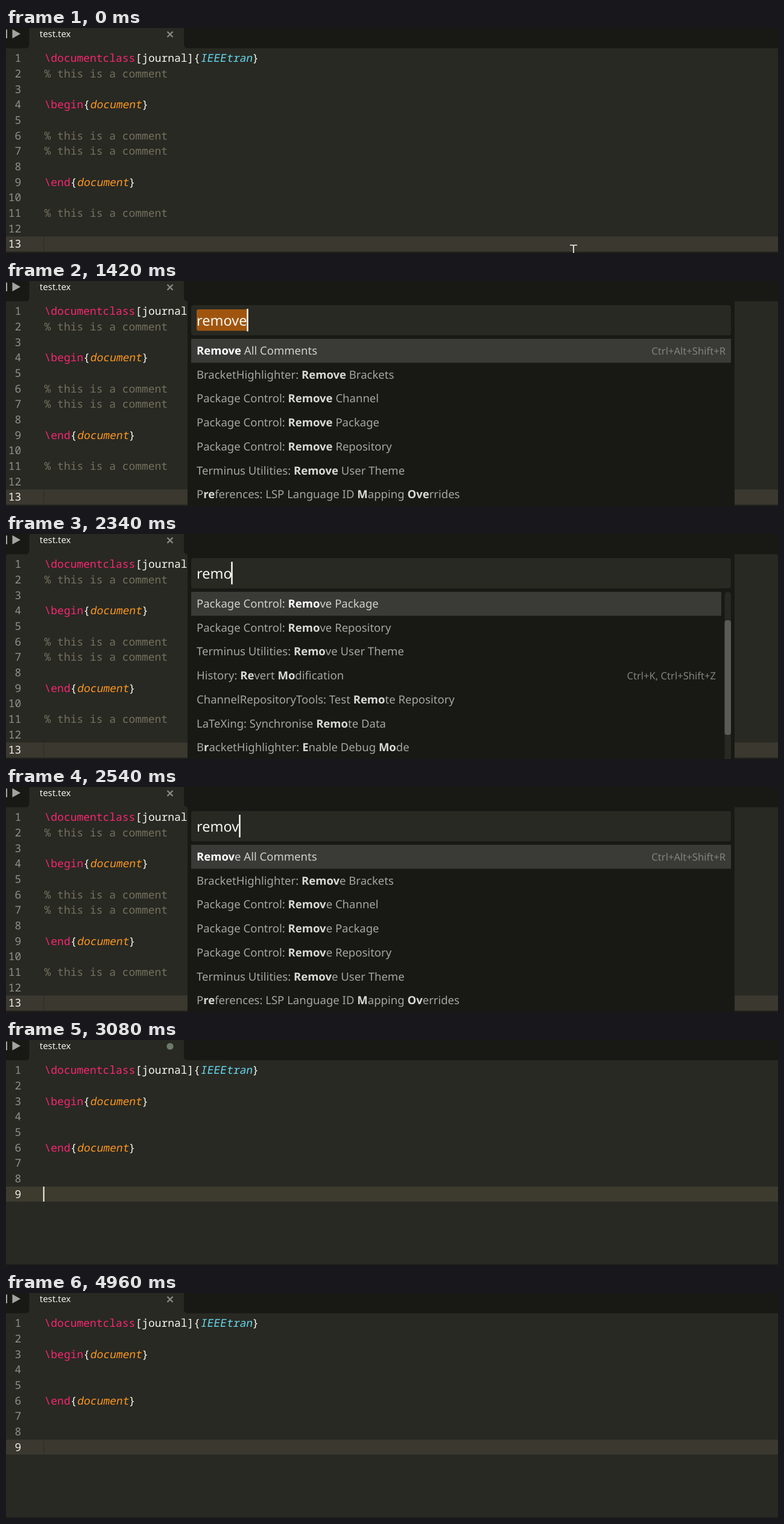
Write an HTML page that moves like this. It is 1280 by 373 pixels and loops after 5.09 s.

```html
<!DOCTYPE html>
<html lang="en">
<head>
<meta charset="utf-8">
<title>Remove all comments</title>
<style>
  html, body { margin: 0; width: 100%; height: 100%; overflow: hidden; background: #282923; }
  svg { display: block; width: 100%; height: 100%; }
  text { white-space: pre; text-rendering: geometricPrecision; }
  .code { font: 17.95px "Noto Sans Mono", "DejaVu Sans Mono", monospace; }
  .ui { font-family: "Noto Sans", "Open Sans", sans-serif; }
  .bold { font-weight: 700; }
</style>
</head>
<body>
<svg id="stage" viewBox="0 0 1280 373" preserveAspectRatio="none"></svg>
<script>
const LOOP = 5090;
const stage = document.getElementById('stage');
const COL = 10.77, LINE = 25.67, CODE_X = 63.6;
const INK = { p: '#f92672', w: '#f8f8f2', b: '#66d9ef', o: '#fd971f', c: '#75715e' };
const BACK = '#282923', DARK = '#181914';

// Each code line is a list of [ink, text] runs
const COMMENT = [['c', '% this is a comment']];
const HEAD = [['p', '\\documentclass'], ['w', '[journal]{'], ['b', 'IEEEtran'], ['w', '}']];
const env = word => [['p', '\\' + word], ['w', '{'], ['o', 'document'], ['w', '}']];
const BEFORE = [HEAD, COMMENT, [], env('begin'), [], COMMENT, COMMENT, [], env('end'), [], COMMENT, [], []];
const AFTER = [HEAD, [], env('begin'), [], [], env('end'), [], [], []];

// Asterisks enclose the matched letters, a bar precedes the shortcut
const LIST_RE = [
  'Permute Lines: *Re*verse', 'Project: *Re*fresh Folders', 'Set Syntax: *RE*G',
  'BracketHighlighter: *Re*move Brackets', 'Package Control: *Re*move Channel',
  'Package Control: *Re*move Package', 'Package Control: *Re*move Repository'];
const LIST_REMO = [
  'Package Control: *Remo*ve Package', 'Package Control: *Remo*ve Repository',
  'Terminus Utilities: *Remo*ve User Theme', 'History: *Re*vert *Mo*dification|Ctrl+K, Ctrl+Shift+Z',
  'ChannelRepositoryTools: Test *Remo*te Repository', 'LaTeXing: Synchronise *Remo*te Data',
  'B*r*acketHighlighter: *E*nable Debug *Mo*de'];
const LIST_REMOVE = [
  '*Remove* All Comments|Ctrl+Alt+Shift+R', 'BracketHighlighter: *Remove* Brackets',
  'Package Control: *Remove* Channel', 'Package Control: *Remove* Package',
  'Package Control: *Remove* Repository', 'Terminus Utilities: *Remove* User Theme',
  'P*re*ferences: LSP Language ID *M*apping *Ove*rrides'];
const unmatchLast = list => list.map(s => s.replace(/(.)\*([^*]*)$/, '*$1$2'));

const short = { rows: LIST_RE, pick: 5, shift: 0.8, thumb: [122, 36] };
const medium = { rows: LIST_REMO, pick: 0, shift: 0, thumb: [143, 190] };
const full = { rows: LIST_REMOVE, pick: 0, shift: 0 };
const PALETTE = [
  [1420, { ...full, typed: 'remove', selected: true }],
  [1820, { ...short, rows: unmatchLast(LIST_RE), typed: 'r' }],
  [2080, { ...short, typed: 're' }],
  [2210, { ...medium, rows: unmatchLast(LIST_REMO), typed: 'rem' }],
  [2340, { ...medium, typed: 'remo' }],
  [2540, { ...full, rows: unmatchLast(LIST_REMOVE), typed: 'remov' }],
  [2670, { ...full, typed: 'remove' }],
  [3080, null]];
const CARET_X = [316, 326, 338, 361, 374, 387, 400];

// Stepped values: [start, value]
const CARET = [[0, 0], [410, 1], [880, 0.5], [1030, 0], [3080, 1], [3500, 0.67], [3600, 0.33], [3700, 0],
  [4020, 0.25], [4090, 0.5], [4160, 0.75], [4220, 1], [4620, 0.5], [4690, 0]];
const MOUSE = [[0, [941, 370.5]], [70, [720, 368]], [140, [450, 365]], [200, [270, 362]], [270, [213.5, 361]],
  [880, null], [3960, [264.5, 354.5]], [4020, [325, 358]], [4090, [395, 361]], [4160, [449, 365]], [4220, null]];

function at(steps, t) {
  let value = null;
  for (const [start, v] of steps) if (t >= start) value = v;
  return value;
}

const rect = (x, y, w, h, fill, r = 0, extra = '') =>
  `<rect x="${x}" y="${y}" width="${w}" height="${h}" rx="${r}" fill="${fill}" ${extra}/>`;
const path = (d, attrs) => `<path d="${d}" ${attrs}/>`;
const label = (x, y, size, fill, body, extra = '') =>
  `<text class="ui" x="${x}" y="${y}" font-size="${size}" fill="${fill}" ${extra}>${body}</text>`;

function codeLine(runs, i, active) {
  const y = 56.2 + i * LINE;
  let out = `<text class="code" x="25.2" y="${y}" text-anchor="end" fill="${active ? '#f0f0ea' : '#90918b'}">${i + 1}</text>`;
  let col = 0;
  for (const [ink, body] of runs) {
    const slant = ink === 'b' || ink === 'o' ? ' skewX(-10)' : '';
    out += `<text class="code" transform="translate(${CODE_X + col * COL} ${y})${slant}" fill="${INK[ink]}">${body}</text>`;
    col += body.length;
  }
  return out;
}

function editor(lines, caret, rowFill) {
  const last = lines.length - 1;
  const top = 37.6 + last * LINE;
  return rect(0, 0, 1280, 373, BACK)
    + rect(0, 371.3, 1280, 1.7, '#1f201b')
    + rect(0, top, 1280, 25, rowFill)
    + rect(62, top, 1, 25, '#2a2a24')
    + (caret ? rect(61.6, top, 2, 25, '#f8f8f0', 0, `opacity="${caret}"`) : '')
    + lines.map((runs, i) => codeLine(runs, i, i === last)).join('');
}

function tabBar(dirty) {
  const mark = dirty
    ? '<circle cx="272" cy="10.5" r="5.6" fill="#6b7a6a"/>'
    : path('M267.5 6l9 9m0-9l-9 9', 'stroke="#8a8b86" stroke-width="2.3" fill="none"');
  return rect(0, 0, 1280, 33.5, DARK)
    + path('M33 34Q38.5 33 38.5 27V0H295V27Q295 33 301 34Z', `fill="${BACK}"`)
    + path('M0 2.5H2V17H0ZM10.5 2L24 9.7L10.5 17.3Z', 'fill="#a3a49f"')
    + label(55.8, 15.3, 14.9, '#f0f0ec', 'test.tex') + mark;
}

function paletteRow(entry, y, active, right) {
  const [title, keys] = entry.split('|');
  const body = title.split('*').map((part, i) => i % 2
    ? `<tspan class="bold" fill="${active ? '#ffffff' : '#d8d8d4'}">${part}</tspan>` : part).join('');
  return label(316, y, 18.54, active ? '#d0d0cc' : '#a5a5a1', body)
    + (keys ? label(right - 9, y, 16.6, '#82827e', keys, 'text-anchor="end"') : '');
}

function palette({ rows, pick, shift, thumb, typed, selected }, caret) {
  const right = thumb ? 1186 : 1202;
  const x = CARET_X[typed.length];
  let out = rect(301, 0, 907, 373, DARK) + rect(307, 40, 895, 50, BACK, 4);
  if (selected) out += rect(316, 47, 85, 35.5, '#a0550f', 3);
  out += label(316, 73.5, 23.5, '#f8f8f2', typed)
    + rect(x - 0.7, 46, 2.4, 37.5, '#ffffff', 0, `opacity="${caret}"`);
  if (thumb) {
    out += rect(1191.5, 96, 10.5, 285, '#282923', 5)
      + rect(1191.5, thumb[0], 10.5, thumb[1], '#5a5b57', 4);
  }
  out += rect(307, 95.8 + pick * 39.7 + shift, right - 307, 39.7, '#3a3a37');
  return out + rows.map((r, i) => paletteRow(r, 122 + i * 39.7 + shift, i === pick, right)).join('');
}

const pointer = ([x, y]) => path(
  `M${x - 6} ${y - 10.5}h4.5q1.5 0 1.5 1.5q0-1.5 1.5-1.5h4.5M${x} ${y - 9}v18` +
  `M${x - 6} ${y + 10.5}h4.5q1.5 0 1.5-1.5q0 1.5 1.5 1.5h4.5`,
  'fill="none" stroke="#f4f4f0" stroke-width="1.7"');

let shown = '';
function draw(t) {
  const edited = t >= 3080;
  const dirty = edited && t < 4960;
  const open = at(PALETTE, t);
  const mouse = at(MOUSE, t);
  const picture = editor(edited ? AFTER : BEFORE, open ? 0 : at(CARET, t), dirty ? '#3c3b2e' : '#3a382f')
    + tabBar(dirty)
    + (open ? palette(open, t >= 2940 ? 0.95 : 1) : '')
    + (mouse ? pointer(mouse) : '');
  if (picture !== shown) stage.innerHTML = shown = picture;
}

const begin = performance.now();
function tick() {
  draw((performance.now() - begin) % LOOP);
  requestAnimationFrame(tick);
}
tick();
</script>
</body>
</html>
```
